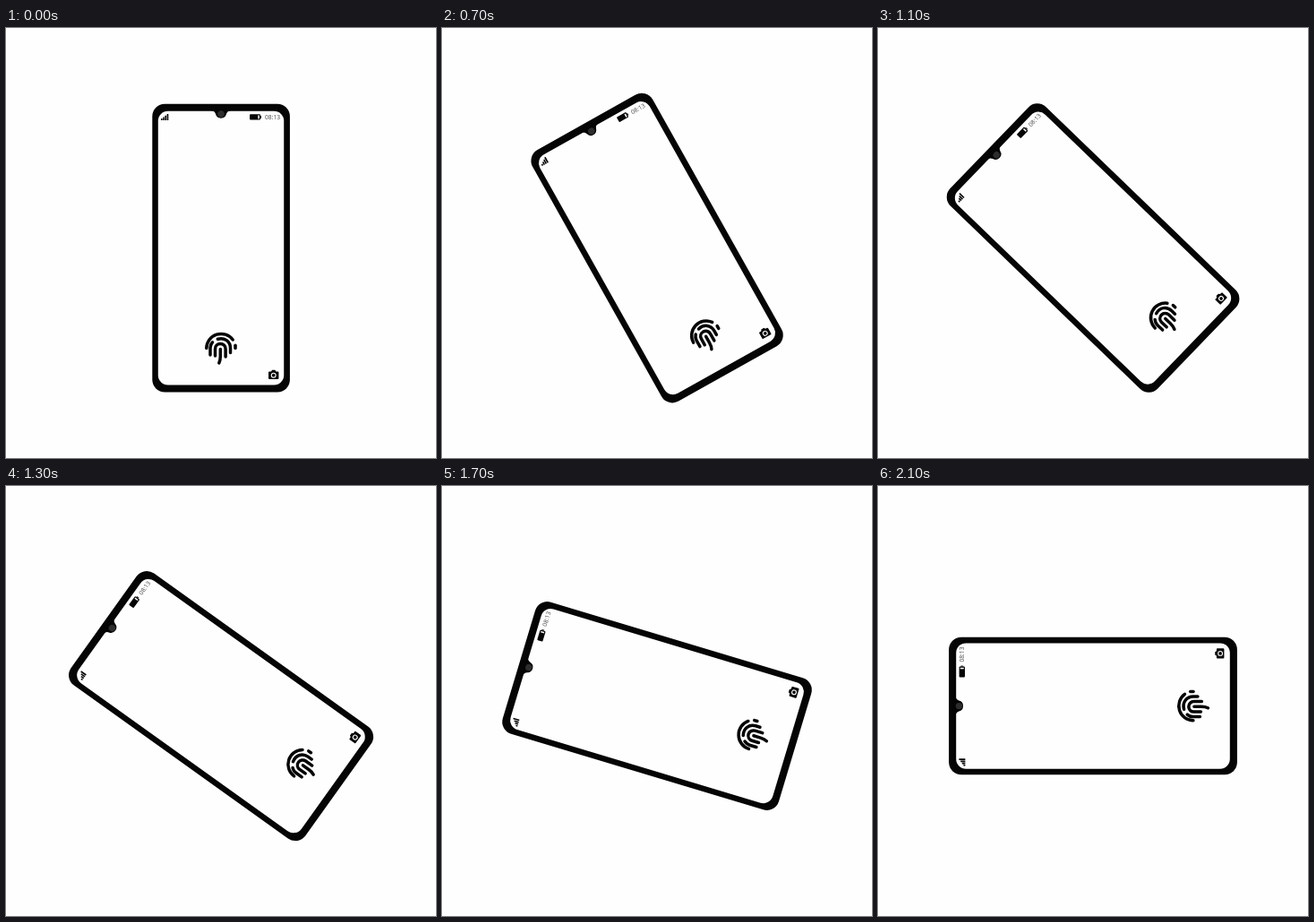
An HTML page for the animation above (2.2 s loop, 480 by 480 pixels).

```html
<!DOCTYPE html>
<html lang="en">
<head>
<meta charset="utf-8">
<title>Rotating phone</title>
<style>
  html, body { margin: 0; width: 100%; height: 100%; overflow: hidden; background: #fefefe; }
  svg { display: block; width: 100vw; height: 100vh; }
  text { font: 6.7px "Open Sans", "Noto Sans", sans-serif; fill: #444; }
</style>
</head>
<body>
<svg viewBox="0 0 480 480">
  <g id="phone" fill="#050505">
    <rect x="163.3" y="84.7" width="153.6" height="321.8" rx="14"/>
    <rect x="169.8" y="92.8" width="140.4" height="305.6" rx="11" fill="#fefefe"/>

    <!-- Camera notch -->
    <path d="M229 92 Q233 92.7 234 96 A6.2 6.2 0 0 0 246 96 Q247 92.7 251 92Z"/>
    <circle cx="240" cy="96" r="3.7" fill="#2d2d2d"/>

    <!-- Status bar -->
    <path d="M173 103v-2h1.6v2zM175.2 103v-3.6h1.6v3.6zM177.4 103v-5.2h1.6v5.2zM179.6 103v-7h1.7v7z"/>
    <rect x="272" y="96.2" width="12" height="6.4" rx="1"/>
    <rect x="281.3" y="97.4" width="1.5" height="4" fill="#fefefe"/>
    <rect x="284" y="98" width="1" height="2.8"/>
    <text x="289" y="102">08:13</text>

    <!-- Fingerprint -->
    <g fill="none" stroke="#050505" stroke-width="3.5" stroke-linecap="round">
      <path d="M223.8 357.5A16.3 16.3 0 0 1 253.2 348"/>
      <path d="M256 354.3V357.6"/>
      <path d="M230.5 350.8Q228 353.5 228 357.2V365"/>
      <path d="M236.3 347.2C244 345 250.5 350 250.5 357.5V362.5"/>
      <path d="M233.5 366V358.2A5.8 5.8 0 0 1 245.1 358.2V367"/>
      <path d="M239.3 358.5V366.5Q239.3 371 237.8 374"/>
    </g>

    <!-- Camera shortcut -->
    <path d="M294 383.5h2l1-1.7h3.4l1 1.7h2q1 0 1 1v6.5q0 1-1 1h-9.4q-1 0-1-1v-6.5q0-1 1-1z"/>
    <circle cx="298.7" cy="387.7" r="2.4" fill="none" stroke="#fefefe" stroke-width="1.1"/>
  </g>
</svg>
<script>
  const LOOP = 2200, STEP = 100, TICKS = 43;
  const phone = document.getElementById("phone");

  // Two ticks per step, with one extra tick skipped late in the turn.
  function angleAt(time) {
    const step = Math.floor((time % LOOP) / STEP);
    const tick = 2 * step + (step >= 16 ? 1 : 0);
    return -90 * tick / TICKS;
  }

  function render(time) {
    phone.setAttribute("transform", `rotate(${angleAt(time)} 240 245.6)`);
  }

  const start = performance.now();
  function loop() {
    render(performance.now() - start);
    requestAnimationFrame(loop);
  }
  loop();
</script>
</body>
</html>
```
